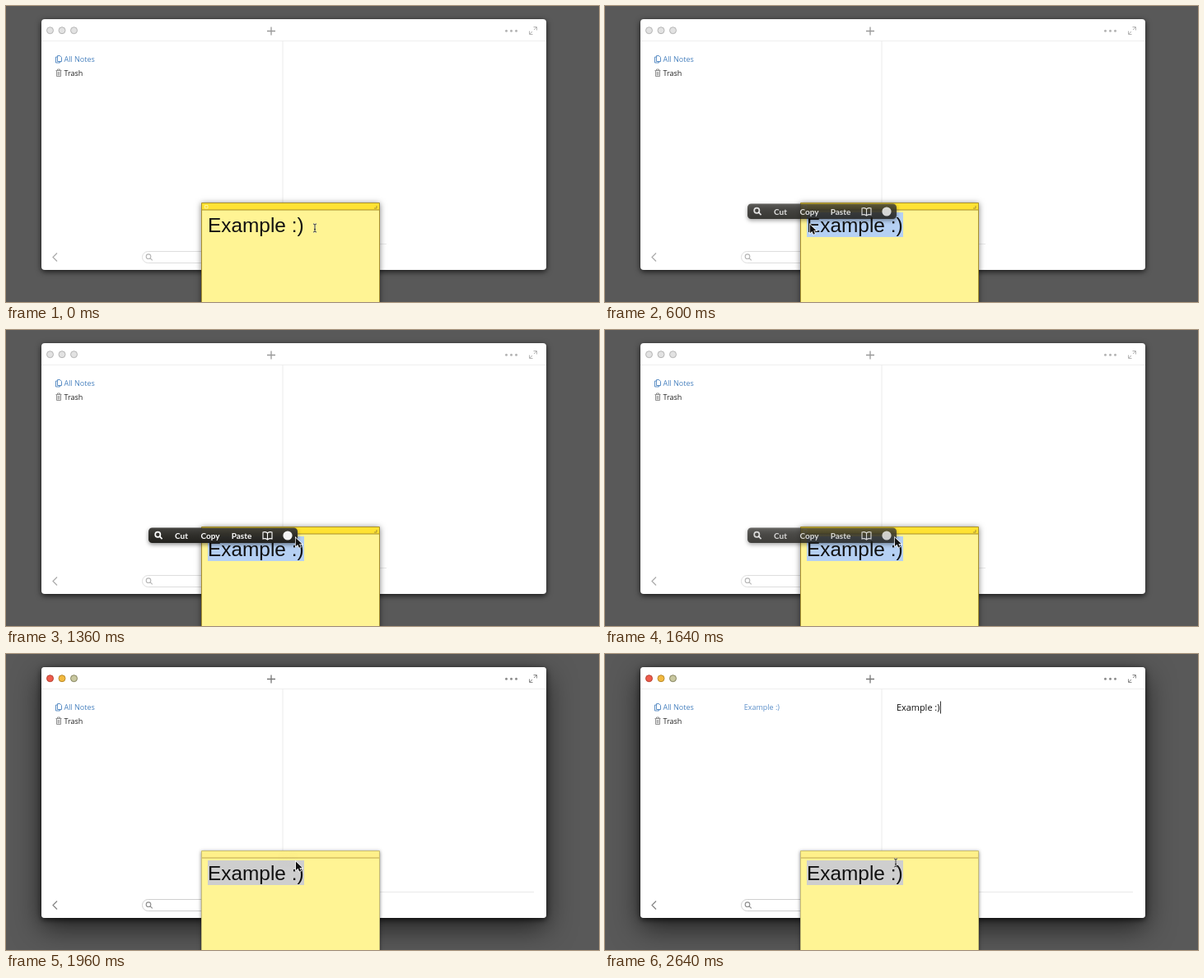
Animation, 720 px wide and 360 px high, one loop 4140 ms. Source, as an HTML page with a canvas:

```html
<!DOCTYPE html>
<html lang="en">
<head>
<meta charset="utf-8">
<title>Note clip</title>
<style>
html, body { margin: 0; width: 100%; height: 100%; overflow: hidden; background: #595959; }
canvas { display: block; }
</style>
</head>
<body>
<canvas id="stage" width="720" height="360"></canvas>
<script>
const c = document.getElementById('stage').getContext('2d');
const LOOP = 4140, ACTIVE = 1720, SAVED = 2480;
const UI = '"Open Sans", "Noto Sans", sans-serif';

const clamp = v => Math.max(0, Math.min(1, v));
const ramp = (t, a, b) => clamp((t - a) / (b - a));
const ease = p => p * p * (3 - 2 * p);
const mix = (a, b, p) => a + (b - a) * p;

function rect(x, y, w, h, fill) {
  c.fillStyle = fill;
  c.fillRect(x, y, w, h);
}
function round(x, y, w, h, r, fill, stroke) {
  c.beginPath();
  c.roundRect(x, y, w, h, r);
  if (fill) { c.fillStyle = fill; c.fill(); }
  if (stroke) { c.strokeStyle = stroke; c.lineWidth = 1; c.stroke(); }
}
function circle(x, y, r, fill, stroke, width = 1) {
  c.beginPath();
  c.arc(x, y, r, 0, 7);
  if (fill) { c.fillStyle = fill; c.fill(); }
  if (stroke) { c.strokeStyle = stroke; c.lineWidth = width; c.stroke(); }
}
function path(d, color, width = 1) {
  c.strokeStyle = color;
  c.lineWidth = width;
  c.stroke(new Path2D(d));
}
function text(s, x, y, font, color, align = 'left') {
  c.font = font;
  c.fillStyle = color;
  c.textAlign = align;
  c.fillText(s, x, y);
}
function shadow(color, blur, dy) {
  c.shadowColor = color;
  c.shadowBlur = blur;
  c.shadowOffsetY = dy;
}
function faded(alpha, draw) {
  if (alpha <= 0) return;
  c.save();
  c.globalAlpha = alpha;
  draw();
  c.restore();
}
function lens(x, y, r, color, width) {
  circle(x, y, r, null, color, width);
  const k = r * 0.7;
  path(`M${x + k} ${y + k}l${r} ${r}`, color, width);
}

function drawWindow(on, saved) {
  c.save();
  if (on) {
    shadow('rgba(0,0,0,.62)', 34, 12);
    round(43, 16, 613, 305, 4, '#fff');
  }
  shadow('rgba(0,0,0,.75)', 7, 2);
  round(43, 16, 613, 305, 4, '#fff');
  c.restore();

  const lights = on ? ['#ee5b4c', '#f2b93f', '#c9c8a0'] : ['#e2e2e2', '#e2e2e2', '#e2e2e2'];
  const rims = on ? ['#b5402f', '#b98a2c', '#85835f'] : ['#b4b4b4', '#b4b4b4', '#b4b4b4'];
  lights.forEach((fill, i) => circle(53.5 + i * 14.5, 29.7, 4, fill, rims[i]));

  const icon = on ? '#8c8c8c' : '#b4b4b4';
  path('M317 30.5h10M322 25.5v10', on ? '#777' : '#999', 1.3);
  for (let i = 0; i < 3; i++) circle(607.5 + i * 6, 30.3, 1.5, icon);
  path('M641 29l3-3M640.5 25.5h4v4M639 31l-3 3M635.5 30.5v4h4', icon);

  rect(43, 42, 613, 1, '#efefef');
  rect(335.5, 42, 1, 248, '#ececec');
  rect(454, 289, on ? 187 : 8, 1, '#e9e9e9');

  const blue = '#4c84c0';
  path('M62.5 60.5h3l2 2v5h-5zM62 62h-1.5v7h5v-1.5', blue, 0.9);
  text('All Notes', 70.5, 67.7, '9px ' + UI, blue);
  path('M60.5 78.5h7M62.5 78v-1h3v1M61.5 79v6.5h5v-6.5M63.2 80v4.5M64.8 80v4.5', '#777', 0.8);
  text('Trash', 70.5, 85, '9px ' + UI, '#222');

  path('M62 300.5l-5 5l5 5', on ? '#858585' : '#aaa', 1.2);
  round(165.5, 298.5, 160, 14, 7, '#fff', on ? '#cfcfcf' : '#dedede');
  lens(173, 304.7, 2.8, on ? '#8c8c8c' : '#b5b5b5', 1.1);

  if (saved) {
    text('Example :)', 168.7, 68.4, '9px ' + UI, '#5b8fc9');
    text('Example :)', 354, 69, '10.9px ' + UI, '#111');
    rect(407, 57.5, 1, 15, '#333');
  }
}

function drawSticky(on, from) {
  c.save();
  shadow('rgba(0,0,0,.5)', on ? 7 : 4, 1);
  rect(237, 239, 217, 130, '#fff494');
  c.restore();
  rect(238, 239, 215, 9, on ? '#ffe233' : '#fff08a');
  path('M237.5 360V239.5H453.5V360', on ? '#a8902c' : '#c9bd72');
  rect(238, 247.5, 215, 1, on ? '#a8902c' : '#c0a84f');
  if (on) {
    path('M241.5 242.5h3.5v3.5h-3.5z', '#fff3a0');
    path('M447 246h3v-3', '#9c8a38', 0.9);
  }
  if (from < 362) rect(from, 251, 362 - from, 30, on ? '#b5d0f3' : '#cecece');
  text('Example :)', 245, 275, '24.4px "Liberation Sans", Arial, sans-serif', '#111');
}

function bubble(x, w) {
  c.save();
  shadow('rgba(0,0,0,.45)', 5, 2);
  const g = c.createLinearGradient(0, 241, 0, 259);
  g.addColorStop(0, 'rgba(62,61,57,.96)');
  g.addColorStop(0.5, 'rgba(43,42,38,.96)');
  g.addColorStop(1, 'rgba(30,29,25,.96)');
  round(x, 240.5, w, 18.5, 4.5, g);
  c.restore();
}
function drawMenu() {
  bubble(173, 181);
  lens(184.3, 248.8, 3.1, '#fff', 1.7);
  [['Cut', 213], ['Copy', 248], ['Paste', 286]].forEach(([s, x]) =>
    text(s, x, 253.6, '700 10px Lato, sans-serif', '#fff', 'center'));
  path('M317.5 247q-2.5-2-5.5-1v8q3-1 5.5 1q2.5-2 5.5-1v-8q-3-1-5.5 1v8', '#fff', 1.1);
  circle(342, 250, 5.6, '#f4f4f4');
}
function drawSpinner(t) {
  bubble(330, 24);
  const head = Math.floor(t / 80);
  for (let i = 0; i < 12; i++) {
    const a = i * Math.PI / 6, x = Math.cos(a), y = Math.sin(a);
    const age = ((head - i) % 12 + 12) % 12;
    path(`M${342 + x * 2.8} ${250 + y * 2.8}L${342 + x * 5.2} ${250 + y * 5.2}`,
      `rgba(255,255,255,${0.95 - age * 0.07})`, 1.1);
  }
}

function drawBeam(x, y) {
  const d = `M${x - 2} ${y - 5}q2 0 2 1.5v7q0 1.5-2 1.5M${x + 2} ${y - 5}q-2 0-2 1.5M${x} ${y + 3.5}q0 1.5 2 1.5M${x - 1} ${y + 1.5}h2`;
  path(d, 'rgba(255,255,255,.5)', 2);
  path(d, '#333', 1);
}
function drawArrow(x, y) {
  const p = new Path2D(`M${x} ${y}v10.5l2.5-2.3l1.7 3.8l1.9-.8l-1.7-3.7h3.3z`);
  c.fillStyle = '#111';
  c.strokeStyle = '#fff';
  c.lineWidth = 1.4;
  c.stroke(p);
  c.fill(p);
}

function drawCursor(t) {
  if (t < 560) return drawBeam(mix(375, 246, ease(ramp(t, 20, 350))), mix(270, 266, ramp(t, 20, 280)));
  if (t >= SAVED) return drawBeam(353, 254);
  const out = ease(ramp(t, 560, 960)), press = ease(ramp(t, 1040, 1400));
  const x = mix(mix(246, 343, out), 352, press);
  const y = mix(mix(266, 258, out), 252.5, press);
  drawArrow(x, y);
}

function draw(t) {
  const on = t >= ACTIVE, saved = t >= SAVED;
  rect(0, 0, 720, 360, '#595959');
  drawWindow(on, saved);
  const drag = mix(375, 246, ease(ramp(t, 20, 350)));
  const stops = [245, 261, 273, 287, 307, 321, 326, 340, 347, 353, 362];
  const from = stops.reduce((a, b) => Math.abs(b - drag) < Math.abs(a - drag) ? b : a);
  drawSticky(!on, from);
  faded(ramp(t, 500, 620) * (1 - ramp(t, 1560, 1960)), drawMenu);
  faded(ramp(t, 1960, 2120) * (1 - ramp(t, 2360, 2480)), () => drawSpinner(t));
  drawCursor(t);
}

const start = performance.now();
function tick() {
  draw((performance.now() - start) % LOOP);
  requestAnimationFrame(tick);
}
tick();
</script>
</body>
</html>
```
